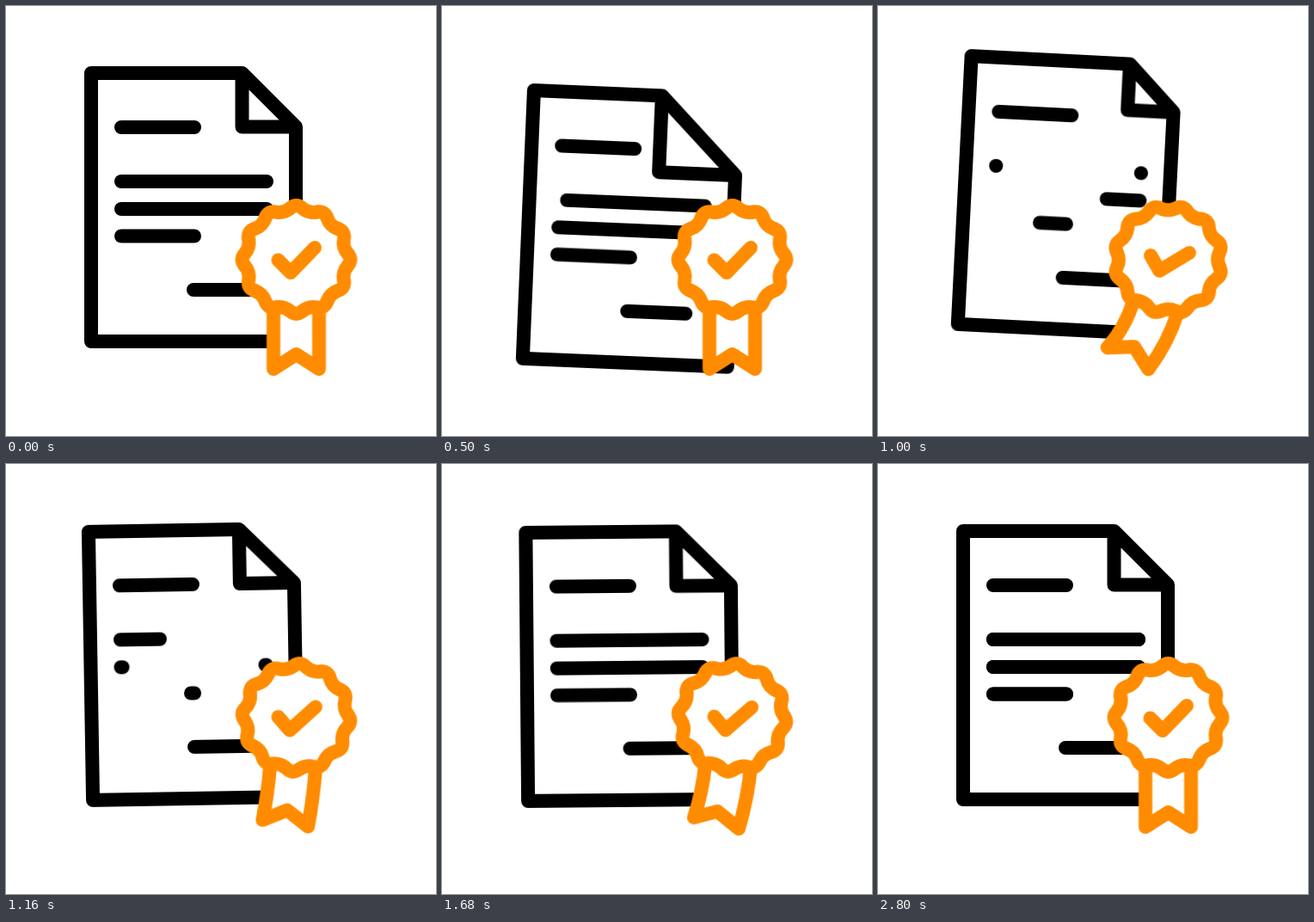
Animation, 500 px wide and 500 px high, one loop 3060 ms. Source, as an HTML page without scripts:

```html
<!DOCTYPE html>
<html lang="en">
<head>
<meta charset="utf-8">
<title>Certificate</title>
<style>
  html, body { margin: 0; width: 100%; height: 100%; overflow: hidden; background: #fff; }
  svg { display: block; width: 100vw; height: 100vh; }

  svg * {
    animation-duration: 3.06s;
    animation-iteration-count: infinite;
    animation-timing-function: cubic-bezier(.37, 0, .63, 1);
    animation-fill-mode: backwards;
  }
  .ink, .seal { fill: none; stroke-width: 16; stroke-linecap: round; stroke-linejoin: round; }
  .ink { stroke: #000; }
  .seal { stroke: #ff8c00; }
  .white { fill: #fff; }

  /* Sheet of paper */
  .drop { animation-name: drop; }
  .tilt { animation-name: tilt; transform-origin: 218px 265px; }
  .page { animation-name: fold; }

  @keyframes drop {
    0%, 8.5% { transform: translateY(0); }
    16.67% { transform: translateY(25px); }
    32.68% { transform: translateY(-14px); }
    43.79% { transform: translateY(14.2px); }
    55.23% { transform: translateY(.8px); }
    60.46%, 100% { transform: translateY(0); }
  }
  @keyframes tilt {
    0%, .65% { transform: rotate(0deg); }
    10.13% { transform: rotate(6deg); }
    25.16% { transform: rotate(-3.8deg); }
    33.33% { transform: rotate(3deg); }
    40.52% { transform: rotate(-2.5deg); }
    46.73% { transform: rotate(1.2deg); }
    53.27% { transform: rotate(-.9deg); }
    57.52% { transform: rotate(.3deg); }
    62.09%, 100% { transform: rotate(0deg); }
  }
  @keyframes fold {
    0%, 8.5%, 60.46%, 100% { d: path("M274.5 78H99V390H337V140.5L274.5 78V140.5H337"); }
    16.67% { d: path("M248 78H99V390H337V167L248 78V167H337"); }
    32.68% { d: path("M283.5 78H99V390H337V131.5L283.5 78V131.5H337"); }
    43.79% { d: path("M262.5 78H99V390H337V152.5L262.5 78V152.5H337"); }
    55.23% { d: path("M273.5 78H99V390H337V141.5L273.5 78V141.5H337"); }
  }

  /* Text lines: wiped out to the right, then written again */
  .wipe, .write { stroke-dasharray: 100 200; }
  .wipe { animation-name: wipe; animation-delay: var(--out, 0s); }
  .write { animation-name: write; animation-delay: var(--in, 0s); }
  .second { --out: .187s; --in: .13s; }
  .third { --out: .242s; --in: .212s; }

  @keyframes wipe {
    0%, 13.56% { stroke-dashoffset: 0; opacity: 1; }
    32.68%, 33.3% { stroke-dashoffset: -99.9; opacity: 1; }
    33.31%, 79.99% { stroke-dashoffset: -99.9; opacity: 0; }
    80%, 100% { stroke-dashoffset: 0; opacity: 1; }
  }
  @keyframes write {
    0%, 32.4% { stroke-dashoffset: 99.9; opacity: 0; }
    32.41%, 32.68% { stroke-dashoffset: 99.9; opacity: 1; }
    47.71%, 100% { stroke-dashoffset: 0; opacity: 1; }
  }

  /* Award badge, drawn around its own centre */
  .turn { animation-name: turn; transform-origin: 0 0; }
  .ribbon { animation-name: sway; }
  .glint { stroke-dasharray: 24 200; opacity: 0; animation-name: glint; animation-timing-function: linear; }

  @keyframes turn {
    0%, 17.65% { transform: rotate(0deg); }
    32.35% { transform: rotate(15deg); }
    44.12% { transform: rotate(-9.2deg); }
    54.9% { transform: rotate(5deg); }
    63.73% { transform: rotate(-1.5deg); }
    70.59%, 100% { transform: rotate(0deg); }
  }
  @keyframes sway {
    0%, 18.3%, 91.5%, 100% { d: path("M-26.5 55Q-26.5 90 -26.5 127L0 110L26.5 127Q26.5 90 26.5 55"); }
    32.68% { d: path("M-26.5 55Q-28 90 -42 117L-12 108L10.5 129Q25 93 26.5 55"); }
    45.42% { d: path("M-26.5 55Q-25 93 -12 129L12 108L42.5 119Q28 90 26.5 55"); }
    55.56% { d: path("M-26.5 55Q-27 90 -34.5 119.5L-8 110L18.5 128Q26 92 26.5 55"); }
    63.73% { d: path("M-26.5 55Q-26 92 -20 128L6 110L33 121Q27 90 26.5 55"); }
    71.57% { d: path("M-26.5 55Q-27 90 -31.5 121L-4.5 109L21.5 126.5Q26.5 92 26.5 55"); }
    79.41% { d: path("M-26.5 55Q-26.5 92 -20.5 127L5.5 109L33 121Q27 90 26.5 55"); }
    86.27% { d: path("M-26.5 55Q-26.5 90 -28.5 125.5L-2 110L24.5 127Q26.5 90 26.5 55"); }
  }
  @keyframes glint {
    0%, 65.68% { stroke-dashoffset: 0; opacity: 0; }
    65.69% { stroke-dashoffset: 0; opacity: 1; }
    71.9% { stroke-dashoffset: -76; opacity: 1; }
    73.86% { stroke-dashoffset: -99.9; opacity: 1; }
    73.87%, 100% { stroke-dashoffset: -99.9; opacity: 0; }
  }
</style>
</head>
<body>
<svg viewBox="0 0 500 500">
  <defs>
    <path id="tooth" d="M-7.18 -59.8Q0 -66 7.18 -59.8Q14.36 -53.6 23.68 -55.38"/>
    <g id="quarter">
      <use href="#tooth"/>
      <use href="#tooth" transform="rotate(30)"/>
      <use href="#tooth" transform="rotate(60)"/>
    </g>
  </defs>

  <g class="drop">
    <g class="tilt ink">
      <path class="page" d="M274.5 78H99V390H337V140.5L274.5 78V140.5H337"/>
      <path d="M134 141H219M218 330H286"/>
      <g>
        <path class="wipe" pathLength="100" d="M134 204H303"/>
        <path class="write" pathLength="100" d="M134 204H303"/>
      </g>
      <g class="second">
        <path class="wipe" pathLength="100" d="M134 236H303"/>
        <path class="write" pathLength="100" d="M134 236H303"/>
      </g>
      <g class="third">
        <path class="wipe" pathLength="100" d="M134 267.5H219"/>
        <path class="write" pathLength="100" d="M134 267.5H219"/>
      </g>
    </g>
  </g>

  <g transform="translate(337.5 295)">
    <g class="turn seal">
      <path class="ribbon white" d="M-26.5 55Q-26.5 90 -26.5 127L0 110L26.5 127Q26.5 90 26.5 55"/>
      <circle class="white" r="58" stroke="none"/>
      <use href="#quarter"/>
      <use href="#quarter" transform="rotate(90)"/>
      <use href="#quarter" transform="rotate(180)"/>
      <use href="#quarter" transform="rotate(270)"/>
      <path d="M-21 .5L-6.5 15L21.5 -14"/>
      <path class="glint ink" pathLength="100" d="M-21 .5L-6.5 15L21.5 -14"/>
    </g>
  </g>
</svg>
</body>
</html>
```
